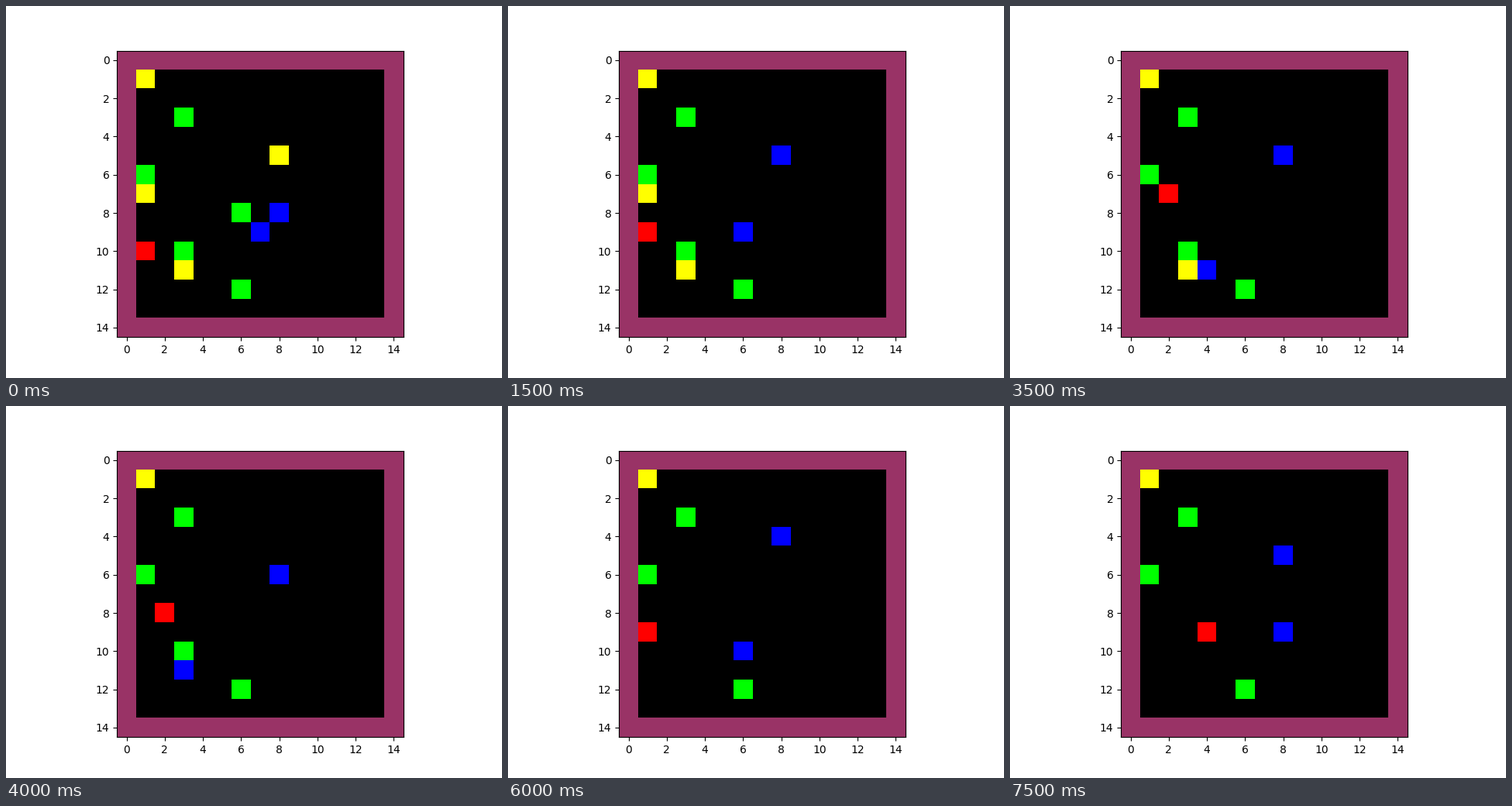
Recreate the animation shown at these times as a matplotlib script. Size 640 px wide and 480 px high, loop 8000 ms.

```python
import numpy as np
import matplotlib.pyplot as plt
from matplotlib.animation import FuncAnimation

SIZE = 15
STEP_MS = 500

WALL = (153, 51, 102)
GREEN = (0, 255, 0)
YELLOW = (255, 255, 0)
RED = (255, 0, 0)
BLUE = (0, 0, 255)

# Cells are (column, row).
GREENS = [(3, 3), (1, 6), (6, 8), (3, 10), (6, 12)]
YELLOWS = [(1, 1), (8, 5), (1, 7), (3, 11)]

MOVES = {"L": (-1, 0), "R": (1, 0), "U": (0, -1), "D": (0, 1), ".": (0, 0)}


def walk(start, moves):
    """All cells visited from start, one per step."""
    path = [start]
    for m in moves:
        (x, y), (dx, dy) = path[-1], MOVES[m]
        path.append((x + dx, y + dy))
    return path


AGENTS = [
    (RED, walk((1, 10), "..UUU.RDDL..RRR")),
    (BLUE, walk((8, 8), "UUUDUDUDUUDUDUD")),
    (BLUE, walk((7, 9), "ULDDLLDLURRRRRU")),
]
STEPS = len(AGENTS[0][1])


def grid(step):
    img = np.zeros((SIZE, SIZE, 3), np.uint8)
    img[[0, -1], :] = WALL
    img[:, [0, -1]] = WALL
    eaten = {cell for _, path in AGENTS for cell in path[:step + 1]}
    for color, items in ((GREEN, GREENS), (YELLOW, YELLOWS)):
        for x, y in items:
            if (x, y) not in eaten:
                img[y, x] = color
    for color, path in AGENTS:
        x, y = path[step]
        img[y, x] = color
    return img


fig, ax = plt.subplots(figsize=(6.4, 4.8), dpi=100)
board = ax.imshow(grid(0), interpolation="nearest")


def update(step):
    board.set_data(grid(step))
    return [board]


anim = FuncAnimation(fig, update, frames=STEPS, interval=STEP_MS,
                     repeat=True, repeat_delay=0)
plt.show()
```
